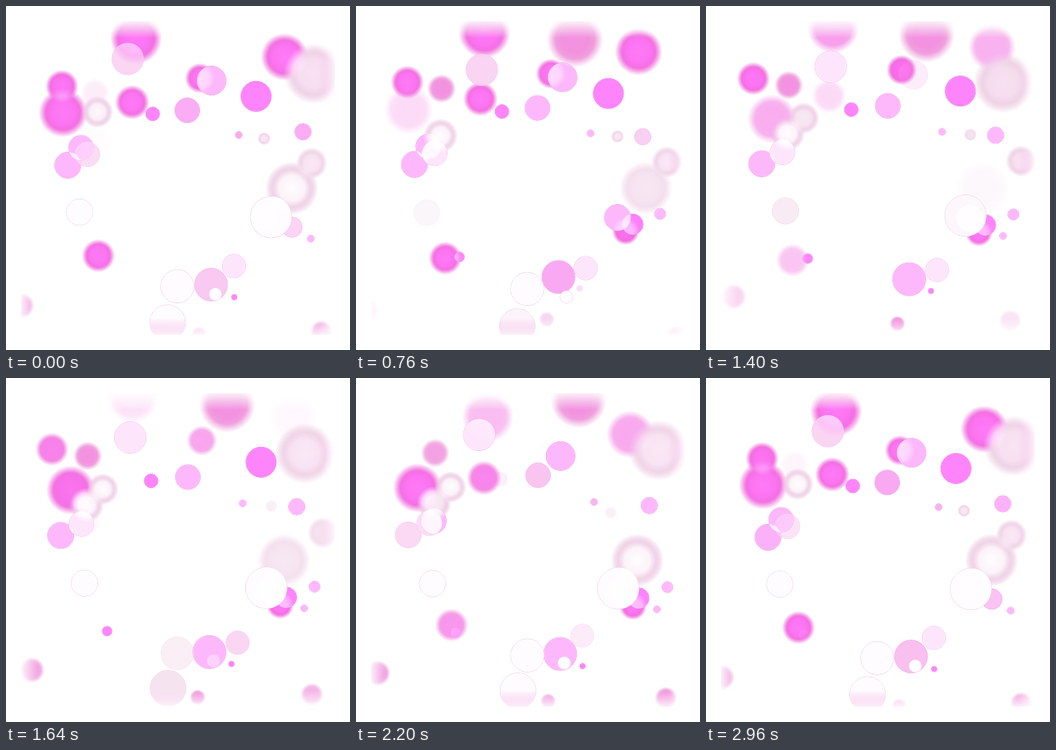
Recreate the animation shown at these times as an HTML page with a canvas. Size 500x500 px, loop 3 s.

```html
<!DOCTYPE html>
<html lang="en">
<head>
<meta charset="utf-8">
<title>Pink bokeh</title>
<style>
html, body { margin: 0; width: 100%; height: 100%; overflow: hidden; background: #fff; }
canvas { display: block; width: 100vw; height: 100vh; }
</style>
</head>
<body>
<canvas id="stage" width="500" height="500"></canvas>
<script>
const LOOP = 3000, STEP = 40, LIFE = 2750;
const SIZE = 500, MARGIN = 22, EDGE = 24;
const CENTER = { x: 250, y: 270 };
const ctx = document.getElementById('stage').getContext('2d');

// full: colour at the peak of a life; dull: colour of rims and fades
const kinds = {
  glow:  { soft: true, full: [255, 122, 247], dull: [236, 80, 212] },
  rose:  { soft: true, full: [244, 146, 226], dull: [236, 146, 214] },
  white: { soft: true, full: [255, 253, 255], dull: [230, 184, 216] },
  pale:  { soft: true, full: [251, 232, 246], dull: [232, 196, 220] },
  hot:   { full: [254, 132, 251], dull: [240, 76, 214] },
  pink:  { full: [253, 184, 251], dull: [236, 112, 210] },
  blush: { full: [253, 230, 251], dull: [240, 156, 222] },
  clear: { full: [255, 252, 255], dull: [224, 176, 208] }
};

// Kind, position and radius at mid-life, in the order they are emitted at a steady rate
const lights = [
  ['pink', 109, 206, 18], ['pink', 299, 108, 21], ['glow', 183, 139, 24],
  ['glow', 133, 364, 23], ['glow', 407, 71, 33], ['glow', 188, 43, 36],
  ['pale', 378, 191, 9], ['blush', 333, 380, 17], ['glow', 283, 100, 21],
  ['pale', 451, 227, 22], ['glow', 75, 111, 23], ['hot', 367, 127, 22],
  ['hot', 212, 153, 10], ['pink', 84, 230, 19], ['pink', 264, 147, 18],
  ['pink', 342, 184, 5], ['pink', 382, 308, 19], ['blush', 112, 213, 18],
  ['rose', 121, 116, 20], ['white', 119, 186, 24], ['pink', 447, 303, 8],
  ['rose', 321, 40, 39], ['glow', 398, 330, 19], ['hot', 147, 368, 7],
  ['hot', 408, 319, 15], ['pink', 296, 399, 24], ['blush', 180, 85, 23],
  ['rose', 279, 467, 11], ['pink', 425, 186, 12], ['hot', 329, 418, 4],
  ['pink', 437, 336, 5], ['pale', 440, 105, 42], ['white', 137, 158, 22],
  ['clear', 382, 306, 30], ['clear', 110, 299, 19], ['glow', 87, 158, 34],
  ['rose', 27, 432, 18], ['rose', 455, 470, 16], ['white', 413, 265, 37],
  ['clear', 235, 459, 26], ['clear', 304, 418, 9], ['clear', 249, 407, 24]
];

const mix = (a, b, k) => a.map((v, i) => v + (b[i] - v) * k);
const rgba = (c, a) => `rgba(${c.map(Math.round)},${a.toFixed(3)})`;

function softFill(r, core, dull, alpha) {
  const g = ctx.createRadialGradient(0, 0, 0, 0, 0, r);
  g.addColorStop(0, rgba(core, alpha));
  g.addColorStop(0.48, rgba(mix(core, dull, 0.15), alpha));
  g.addColorStop(0.7, rgba(mix(core, dull, 0.7), alpha * 0.88));
  g.addColorStop(0.85, rgba(dull, alpha * 0.42));
  g.addColorStop(1, rgba(dull, 0));
  return g;
}

function drawLight([name, x, y, r], i, t) {
  const { soft, full, dull } = kinds[name];
  const born = i * LOOP / lights.length - LIFE / 2;
  const age = (t - born + LOOP) % LOOP;
  if (age >= LIFE) return;

  const level = Math.min(1, Math.min(age, LIFE - age) / (soft ? 700 : 450));
  const alpha = Math.min(1, level * 1.3);
  const core = mix(dull, full, level);
  // Everything drifts outward; blurred lights are nearer and faster
  const zoom = 1 + (soft ? 0.05 : 0.038) * (age - LIFE / 2) / 1000;
  const radius = soft ? r * 1.05 : r;

  ctx.save();
  ctx.translate(CENTER.x + (x - CENTER.x) * zoom, CENTER.y + (y - CENTER.y) * zoom);
  ctx.beginPath();
  ctx.arc(0, 0, radius, 0, Math.PI * 2);
  ctx.fillStyle = soft ? softFill(radius, core, dull, alpha) : rgba(core, alpha);
  ctx.fill();
  if (!soft) {
    ctx.strokeStyle = rgba(dull, alpha * 0.85);
    ctx.stroke();
  }
  ctx.restore();
}

// Shades all four sides of the stage with one colour fading inward
function shadeEdges(mode, color, strength) {
  const half = SIZE / 2, top = MARGIN - half;
  const g = ctx.createLinearGradient(0, top, 0, top + EDGE);
  g.addColorStop(0, rgba(color, strength));
  g.addColorStop(1, rgba(color, 0));
  ctx.save();
  ctx.globalCompositeOperation = mode;
  ctx.fillStyle = g;
  ctx.translate(half, half);
  for (let side = 0; side < 4; side++) {
    ctx.fillRect(-half, top, SIZE, EDGE);
    ctx.rotate(Math.PI / 2);
  }
  ctx.restore();
}

function draw(t) {
  ctx.clearRect(0, 0, SIZE, SIZE);
  ctx.save();
  ctx.beginPath();
  ctx.rect(MARGIN, MARGIN, SIZE - 2 * MARGIN, SIZE - 2 * MARGIN);
  ctx.clip();
  // Screen lets overlapping lights merge into brighter ones
  ctx.globalCompositeOperation = 'screen';
  lights.forEach((light, i) => drawLight(light, i, t));
  shadeEdges('source-atop', kinds.rose.dull, 0.8);
  shadeEdges('destination-out', [0, 0, 0], 0.85);
  ctx.restore();
}

const start = performance.now();
function frame() {
  const elapsed = performance.now() - start;
  draw(Math.floor(elapsed / STEP) * STEP % LOOP);
  requestAnimationFrame(frame);
}
frame();
</script>
</body>
</html>
```
